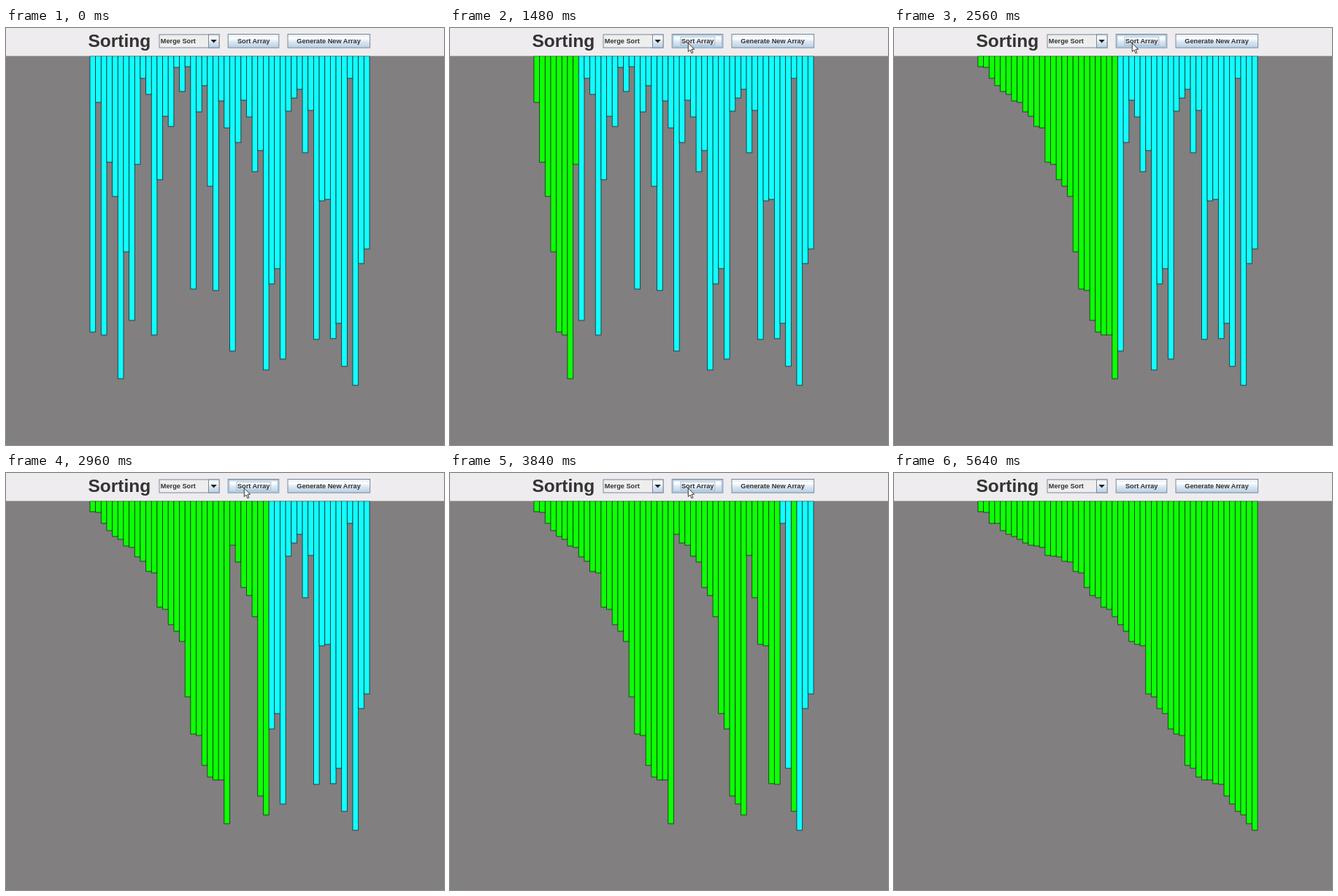
Animation of 600x572 px, one loop 5720 ms. Source, as an HTML page:

```html
<!DOCTYPE html>
<html lang="en">
<head>
<meta charset="utf-8">
<title>Merge sort</title>
<style>
  html, body { margin: 0; width: 100%; height: 100%; overflow: hidden; background: #817f80; }
  svg { display: block; width: 600px; height: 572px; }
  text { font-family: "Liberation Sans", Arial, sans-serif; font-weight: bold; fill: #333; }
  .label { font-size: 9.2px; }
  .frame { stroke: #7a8a99; stroke-width: 1; }
  .ring { fill: none; stroke: #a9c6e2; stroke-width: 1.6; visibility: hidden; }
  .bar { stroke: #000; stroke-opacity: .72; stroke-width: .85; }
</style>
</head>
<body>
<svg viewBox="0 0 600 572">
  <defs>
    <linearGradient id="metal" x1="0" y1="0" x2="0" y2="1">
      <stop offset="0" stop-color="#dfe9f3"/>
      <stop offset=".3" stop-color="#fff"/>
      <stop offset=".55" stop-color="#dce7f2"/>
      <stop offset="1" stop-color="#b8cfe5"/>
    </linearGradient>
  </defs>
  <rect width="600" height="572" fill="#817f80"/>
  <g id="bars"></g>
  <rect width="600" height="38.4" fill="#eeecee"/>
  <text x="112.4" y="26.2" font-size="24.5">Sorting</text>

  <rect class="frame" x="210" y="9" width="82" height="18" fill="#eee"/>
  <rect class="frame" x="277.5" y="9" width="14.5" height="18" fill="url(#metal)"/>
  <path d="M280.3 16h8.6l-4.3 4.6z" fill="#222"/>
  <text class="label" x="211.8" y="21.3">Merge Sort</text>

  <rect id="sortFace" class="frame" x="304.2" y="8.5" width="69.6" height="18.6" fill="url(#metal)"/>
  <rect id="sortRing" class="ring" x="305.5" y="9.8" width="67" height="16"/>
  <rect id="focus" x="316" y="12.2" width="46.8" height="11.4" fill="none" stroke="#a3b8cc" stroke-width=".9"/>
  <text class="label" x="316.9" y="21.3">Sort Array</text>

  <rect class="frame" x="386" y="8.5" width="112.6" height="18.6" fill="url(#metal)"/>
  <rect id="newRing" class="ring" x="387.3" y="9.8" width="110" height="16"/>
  <text class="label" x="398.3" y="21.3">Generate New Array</text>

  <path id="cursor" d="M0 0V11.6L2.7 9.2L4.7 13.8L6.6 13L4.6 8.5H8.3Z" fill="#fff" stroke="#222" stroke-width=".9" stroke-linejoin="round"/>
</svg>
<script>
const LOOP = 5720, TICK = 40;
const TOP = 38.5, LEFT = 115, PITCH = 7.66;
const FIRST_MERGE = 1015, MERGE_GAP = 67;
const CYAN = "#12feff", GREEN = "#0eff06";

// y of each bar's lower end
const ends = [
  417, 102, 421, 184, 231, 481, 307, 401, 187, 69,
  91, 421, 208, 121, 135, 54, 87, 53, 358, 115,
  79, 217, 360, 100, 137, 443, 157, 99, 122, 197,
  168, 469, 351, 330, 454, 114, 96, 84, 171, 113,
  427, 237, 235, 426, 405, 464, 69, 490, 323, 303
];

const $ = id => document.getElementById(id);
const show = (el, on) => { el.style.visibility = on ? "visible" : "hidden"; };
const between = (t, a, b) => t >= a && t < b;
const mix = (a, b, p) => a + (b - a) * p;
const clamp = p => Math.max(0, Math.min(1, p));

const list = ends.map(end => ({ end, done: false }));
const states = [];
const save = () => states.push(list.map(b => ({ ...b })));

function merge(lo, mid, hi) {
  const left = list.slice(lo, mid + 1), right = list.slice(mid + 1, hi + 1);
  let k = lo;
  while (left.length && right.length) {
    list[k++] = left[0].end <= right[0].end ? left.shift() : right.shift();
    list[k].done = true; // marks the bar in the next slot before it is replaced
  }
  for (const b of [...left, ...right]) list[k++] = b;
  save();
}

function sort(lo, hi) {
  if (lo >= hi) return;
  const mid = (lo + hi) >> 1;
  sort(lo, mid);
  sort(mid + 1, hi);
  merge(lo, mid, hi);
}

save();
sort(0, list.length - 1);

const bars = ends.map((_, i) => {
  const r = document.createElementNS("http://www.w3.org/2000/svg", "rect");
  r.setAttribute("class", "bar");
  r.setAttribute("x", (LEFT + i * PITCH).toFixed(2));
  r.setAttribute("y", TOP);
  r.setAttribute("width", PITCH);
  $("bars").appendChild(r);
  return r;
});

function cursorAt(t) {
  if (t < 3000) {
    const p = 1 - (1 - clamp((t - 40) / 520)) ** 2;
    return [mix(8, 326.3, p), mix(72, 20.8, p)];
  }
  const p = clamp((t - 4480) / 360) ** 1.6;
  return [mix(326.3, 488, p), mix(20.8, 24, p)];
}

let shown = -1;
function draw(t) {
  const step = t < FIRST_MERGE ? 0
    : Math.min(states.length - 1, 1 + Math.floor((t - FIRST_MERGE) / MERGE_GAP));
  if (step !== shown) {
    states[step].forEach((b, i) => {
      bars[i].setAttribute("height", b.end - TOP);
      bars[i].setAttribute("fill", b.done ? GREEN : CYAN);
    });
    shown = step;
  }
  const [x, y] = cursorAt(t);
  const visible = between(t, 40, 4840);
  $("cursor").setAttribute("transform", `translate(${x.toFixed(1)} ${y.toFixed(1)})`);
  show($("cursor"), visible);
  const inRow = visible && y < 27;
  show($("sortRing"), inRow && between(x, 304, 374));
  show($("newRing"), inRow && between(x, 386, 499));
  show($("focus"), between(t, 800, 5560));
  $("sortFace").setAttribute("fill", between(t, 800, 920) ? "#b8cfe5" : "url(#metal)");
}

const start = performance.now();
function loop() {
  const t = (performance.now() - start) % LOOP;
  draw(Math.floor(t / TICK) * TICK);
  requestAnimationFrame(loop);
}
draw(0);
requestAnimationFrame(loop);
</script>
</body>
</html>
```
